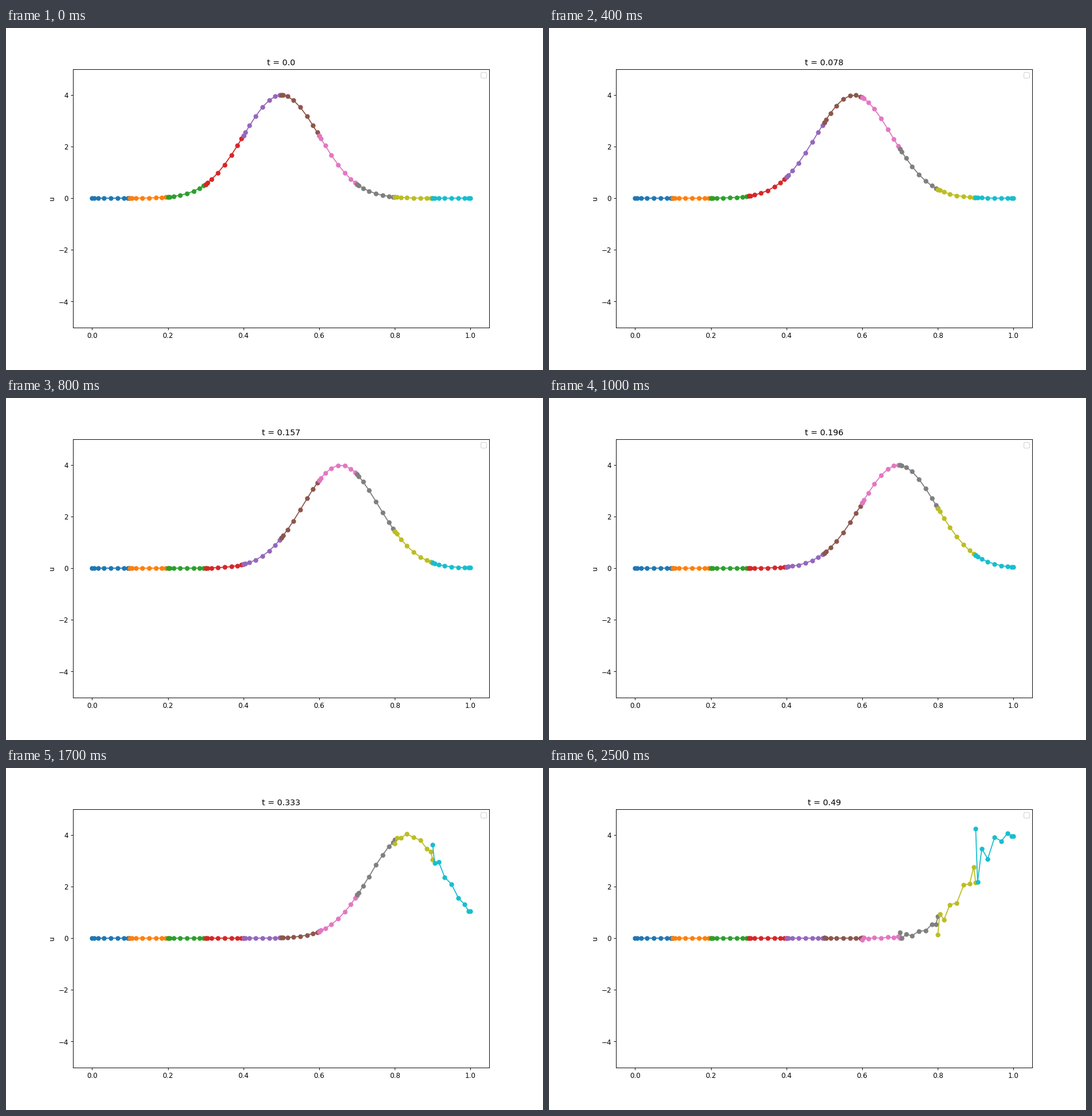
A matplotlib script that plays this animation: 938 px wide and 597 px high, repeating every 2600 ms.

```python
import numpy as np
from numpy.polynomial import legendre
import matplotlib.pyplot as plt
from matplotlib.animation import FuncAnimation

ORDER, CELLS = 8, 10
FRAMES, FRAME_DT, SUBSTEPS = 26, 0.01959, 50
WIDTH = 1 / CELLS
UPWIND = 0.75  # share of the upstream value in the interface flux

# Legendre-Gauss-Lobatto nodes and nodal operators on [-1, 1]
top_mode = np.eye(ORDER + 1)[ORDER]
inner = np.sort(legendre.legroots(legendre.legder(top_mode)).real)
nodes = np.concatenate([[-1], inner, [1]])
scale = np.sqrt(np.arange(ORDER + 1) + 0.5)
vander = legendre.legvander(nodes, ORDER) * scale
slopes = np.column_stack([
    legendre.legval(nodes, legendre.legder(mode)) * s
    for mode, s in zip(np.eye(ORDER + 1), scale)])
diff = slopes @ np.linalg.inv(vander)
inv_mass = vander @ vander.T
lift_left, lift_right = inv_mass[:, :1], inv_mass[:, -1:]

x = WIDTH * (np.arange(CELLS) + (nodes[:, None] + 1) / 2)
right_weight = np.full(CELLS, 1 - UPWIND)
right_weight[-1] = UPWIND


def rhs(u):
    """Advection with unit speed and zero values outside the domain."""
    left_jump = u[0] - np.append(0, u[-1, :-1])
    right_jump = u[-1] - np.append(u[0, 1:], 0)
    du = (-diff @ u - lift_left * UPWIND * left_jump
          + lift_right * right_weight * right_jump) * 2 / WIDTH
    du[-1, -1] = du[-2, -1]
    return du


def rk4(u, dt):
    k1 = rhs(u)
    k2 = rhs(u + dt / 2 * k1)
    k3 = rhs(u + dt / 2 * k2)
    k4 = rhs(u + dt * k3)
    return u + dt / 6 * (k1 + 2 * k2 + 2 * k3 + k4)


def solve():
    sigma = 0.1
    u = np.exp(-((x - 0.5) / sigma) ** 2 / 2) / (sigma * np.sqrt(2 * np.pi))
    u[-1, -1] = u[-2, -1]
    states = [u]
    for _ in range(FRAMES - 1):
        for _ in range(SUBSTEPS):
            u = rk4(u, FRAME_DT / SUBSTEPS)
        states.append(u)
    return states


states = solve()

# 11 x 7 inches, truncated to a canvas of 938 x 597 pixels
fig, ax = plt.subplots(figsize=(11, 7), dpi=85.3)
fig.subplots_adjust(left=0.125, right=0.9, bottom=0.1247, top=0.88)
lines = [ax.plot(x[:, k], states[0][:, k], "o-", color=f"C{k}")[0]
         for k in range(CELLS)]
ax.set_xlim(-0.05, 1.05)
ax.set_ylim(-5, 5)
ax.set_yticks(range(-4, 5, 2))
ax.set_ylabel("u")
ax.legend([], [], loc="upper right")
title = ax.set_title("t = 0.0")


def update(i):
    for k, line in enumerate(lines):
        line.set_ydata(states[i][:, k])
    title.set_text(f"t = {round(i * FRAME_DT, 3)}")
    return [*lines, title]


anim = FuncAnimation(fig, update, frames=FRAMES, interval=100,
                     repeat=True, repeat_delay=0, blit=False)
plt.show()
```
